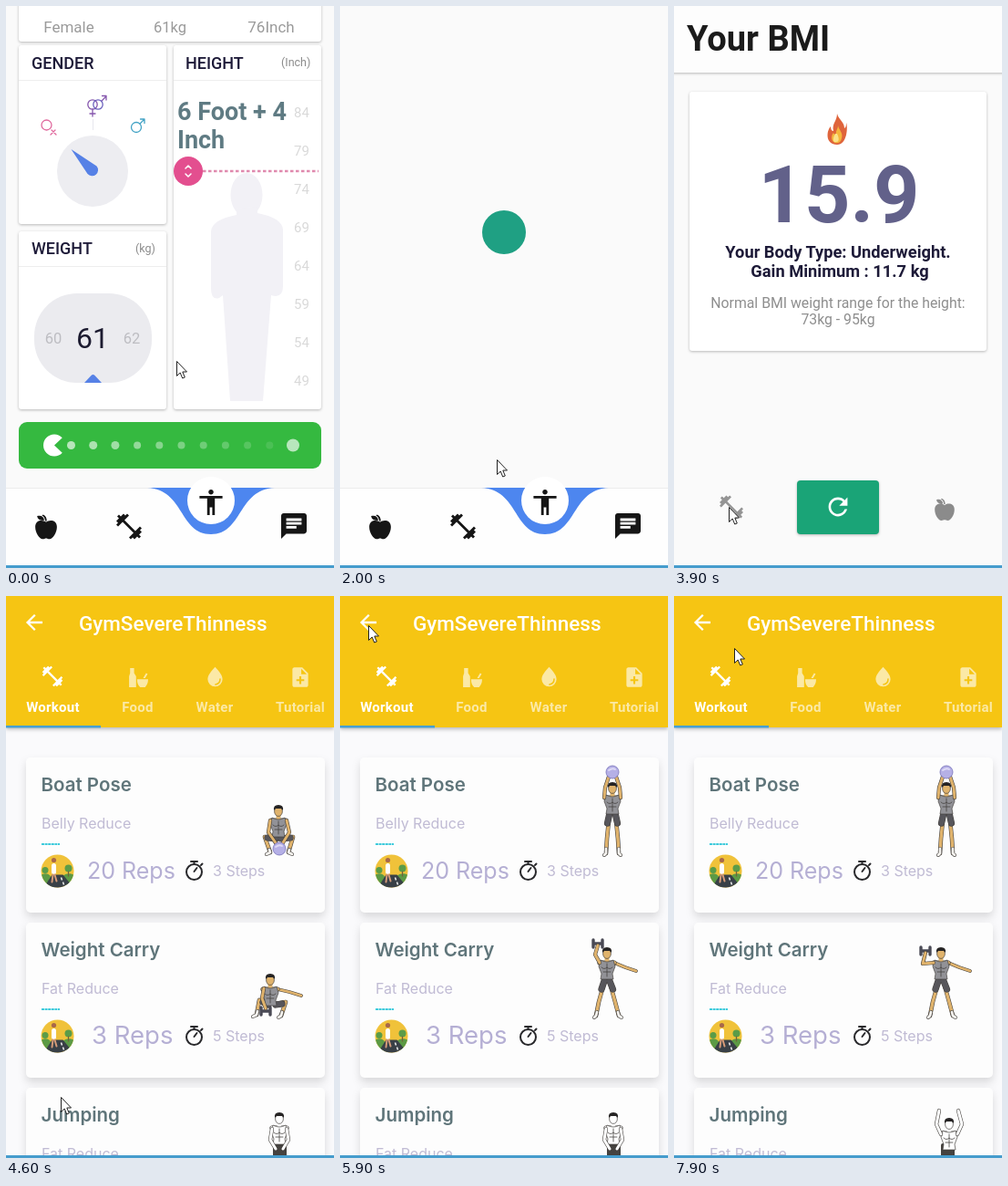
Write an HTML page that moves like this. It is 360 px wide and 616 px high and loops after 8 s.

```html
<!DOCTYPE html>
<html lang="en">
<head>
<meta charset="utf-8">
<title>BMI calculator</title>
<style>
html, body { margin: 0; width: 100%; height: 100%; overflow: hidden; background: #fafafa; }
#stage { display: block; width: 100vw; height: 100vh; font-family: Roboto, sans-serif; }
.card { fill: #fff; filter: drop-shadow(0 1px 1.5px #0004); }
.tall { fill: #fdfdfd; filter: drop-shadow(0 5px 5px #0002); }
.b { font-weight: 700; }
.m { font-weight: 500; }
.s { font-weight: 600; }
.geo { font-family: Inter, sans-serif; }
.mid { text-anchor: middle; }
.line { fill: none; stroke-linecap: round; stroke-linejoin: round; }
</style>
</head>
<body>
<svg id="stage" viewBox="0 0 360 616" preserveAspectRatio="none"></svg>
<script>
const LOOP = 8000;
let css = '';

// Frames are [ms, declarations]; the last one holds until the loop restarts.
const anim = (name, ...frames) => {
  const last = frames[frames.length - 1][1];
  const body = [...frames, [LOOP, last]].map(([ms, d]) => `${ms / LOOP * 100}%{${d}}`).join('');
  css += `@keyframes ${name}{${body}}.${name}{animation:${name} ${LOOP}ms linear infinite}`;
};
const move = (x, y, extra = '') => `transform:translate(${x}px,${y}px)${extra}`;
const shape = d => `d:path("${d}")`;
const swing = (name, times, poses) => anim(name, ...times.map(([ms, p]) => [ms, poses[p]]));
const ease = ';animation-timing-function:ease-in-out';

const text = (x, y, size, fill, str, cls = '') =>
  `<text x="${x}" y="${y}" font-size="${size}" fill="${fill}" class="${cls}">${str}</text>`;
const icon = (x, y, scale, fill, d) =>
  `<path transform="translate(${x} ${y}) scale(${scale}) translate(-12 -12)" fill="${fill}" d="${d}"/>`;
const rect = (x, y, w, h, r, attrs) =>
  `<rect x="${x}" y="${y}" width="${w}" height="${h}" rx="${r}" ${attrs}/>`;
const circle = (x, y, r, attrs) => `<circle cx="${x}" cy="${y}" r="${r}" ${attrs}/>`;

const ICONS = {
  person: 'M12 2c1.1 0 2 .9 2 2s-.9 2-2 2-2-.9-2-2 .9-2 2-2zm9 7h-6v13h-2v-6h-2v6H9V9H3V7h18v2z',
  chat: 'M20 2H4c-1.1 0-2 .9-2 2v18l4-4h14c1.1 0 2-.9 2-2V4c0-1.1-.9-2-2-2zM6 9h12v2H6V9zm8 5H6v-2h8v2zm4-6H6V6h12v2z',
  refresh: 'M17.65 6.35C16.2 4.9 14.21 4 12 4c-4.42 0-8 3.58-8 8s3.58 8 8 8c3.73 0 6.84-2.55 7.73-6h-2.08c-.82 2.33-3.04 4-5.65 4-3.31 0-6-2.69-6-6s2.69-6 6-6c1.66 0 3.14.69 4.22 1.78L13 11h7V4z',
  back: 'M20 11H7.83l5.59-5.59L12 4l-8 8 8 8 1.41-1.41L7.83 13H20z',
  note: 'M14 2H6c-1.1 0-2 .9-2 2v16c0 1.1.9 2 2 2h12c1.1 0 2-.9 2-2V8zm2 14h-3v3h-2v-3H8v-2h3v-3h2v3h3zm-3-7V3.5L18.5 9z',
  weights: 'M20.57 14.86L22 13.43 20.57 12 17 15.57 8.43 7 12 3.43 10.57 2 9.14 3.43 7.71 2 5.57 4.14 4.14 2.71 2.71 4.14l1.43 1.43L2 7.71l1.43 1.43L2 10.57 3.43 12 7 8.43 15.57 17 12 20.57 13.43 22l1.43-1.43L16.29 22l2.14-2.14 1.43 1.43 1.43-1.43-1.43-1.43L22 16.29z',
  apple: 'M12 8c2-2 9-2.500 9 4 0 5-3.500 10-6 10-1.500 0-2-.6-3-.6s-1.500.6-3 .6c-2.500 0-6-5-6-10 0-6.500 7-6 9-4zM11.300 7C11 4.500 10 3 8.500 2.500l1-.8C11.500 2.500 12.500 4 12.600 7zM4.500 3c3-1 5.500 0 6 3.500C7.500 7 5 6 4.500 3z',
  drop: 'M12 2c4.500 5 7.500 8.500 7.500 12.500a7.500 7.500 0 0 1-15 0C4.500 10.500 7.500 7 12 2z',
  food: 'M4 3h4v5l2 3v11H3V11l1-3zM11 14h11c0 4-1.500 6-3 8h-5c-2-2-3-4-3-8zm6-1 3-5 1.500.8L19 13z'
};

// ---- Input page ----
anim('home', [0, 'opacity:1'], [1400, 'opacity:1'], [1700, 'opacity:0']);
anim('nav', [0, 'opacity:1'], [2200, 'opacity:1'], [2500, 'opacity:0']);
anim('marker', [0, move(0, 0)], [100, move(0, 0, ease)], [300, move(0, -8)]);
anim('body', [0, 'transform:scaleY(1)'], [100, 'transform:scaleY(1)' + ease], [300, 'transform:scaleY(1.032)']);
css += '.body{transform-origin:264px 433px}';
anim('before', [0, 'opacity:1'], [200, 'opacity:1'], [200.1, 'opacity:0']);
anim('after', [0, 'opacity:0'], [200, 'opacity:0'], [200.1, 'opacity:1']);
anim('dot', [0, 'opacity:var(--from)'], [100, 'opacity:var(--from)'], [500, 'opacity:var(--to)']);
anim('pac', [0, move(0, 0)], [900, move(0, 0, ease)], [1450, move(262, 0)]);
const wide = 'stroke-dasharray:76 24;stroke-dashoffset:-12';
const shut = 'stroke-dasharray:98 2;stroke-dashoffset:-1';
anim('chomp', ...[0, 900, 1000, 1100, 1200, 1300, 1400, 1500].map((ms, i) => [ms, i > 1 && i % 2 === 0 ? shut : wide]));

const scale = [84, 79, 74, 69, 64, 59, 54, 49]
  .map((n, i) => text(316, 121.500 + 42 * i, 15, '#d9d9d9', n)).join('');
const dots = Array.from({ length: 10 }, (_, i) =>
  circle(71.500 + 24.200 * i, 481.500, i < 3 ? 4.500 : 4,
    `class="dot" fill="#fff" style="--from:${(0.650 - 0.060 * i).toFixed(2)};--to:${i ? 0.180 : 0.450}"`)).join('');
const swap = (a, b) => `<g class="before">${a}</g><g class="after">${b}</g>`;
const foot = n => text(188, 125, 27, '#5f7b83', `6 Foot + ${n}`, 'b');

const home = `<g class="home">
  ${rect(14, -10, 332, 49, 3, 'class="card"')}
  ${rect(14, 43, 162, 196, 3, 'class="card"')}
  ${rect(14, 247, 162, 195, 3, 'class="card"')}
  ${rect(184, 43, 162, 399, 3, 'class="card"')}
  <path stroke="#eee" d="M14 81.500H176M184 81.500H346M14 285.500H176"/>
  ${text(69, 29, 17, '#9a9a9a', 'Female', 'mid')}
  ${text(180, 29, 16.500, '#9a9a9a', '61kg', 'mid')}
  ${swap(text(291, 29, 17, '#9a9a9a', '76Inch', 'mid'), text(291, 29, 17, '#9a9a9a', '77Inch', 'mid'))}
  ${text(28, 69, 18, '#1d1a38', 'GENDER', 'm')}
  ${text(197, 69, 18, '#1d1a38', 'HEIGHT', 'm')}
  ${text(28, 272, 18, '#1d1a38', 'WEIGHT', 'm')}
  ${text(302, 66, 12.500, '#8c8c8c', '(Inch)')}
  ${text(142, 270, 12.500, '#8c8c8c', '(kg)')}
  ${circle(95, 181, 39, 'fill="#ededf1"')}
  <path fill="#5681e6" d="M71.500 157 99.500 175.500A6.500 6.500 0 1 1 89.500 184Z"/>
  <path stroke="#e6e6ee" d="M95.500 124v12"/>
  <g class="line" stroke-width="1.300">
    <path stroke="#e0699d" d="M50 136l5 5M54 136l-5 5"/>${circle(44.500, 130.500, 5.500, 'stroke="#e0699d"')}
    <path stroke="#8657ad" d="M95 113v8M92 118h6M105 104l5-5M105.500 98.500h4.500v4.500"/>
    ${circle(95, 108, 5.200, 'stroke="#8657ad"')}${circle(101, 108, 5.200, 'stroke="#6a60bd"')}
    <path stroke="#43a3c5" d="M147 129l5-5M147.500 124h4.500v4.500"/>${circle(143, 133, 5.500, 'stroke="#43a3c5"')}
  </g>
  ${rect(31, 315, 129, 98, 47, 'fill="#ebebef"')}
  ${text(52, 370, 16.500, '#bdbdc2', '60', 'mid')}
  ${text(95, 375, 32, '#1c1b30', '61', 'mid')}
  ${text(138, 370, 16.500, '#bdbdc2', '62', 'mid')}
  <path fill="#5681e6" d="M86 413 93.500 405Q95.500 403 97.500 405L105 413Z"/>
  <g class="body" fill="#f2f1f6">
    <ellipse cx="264" cy="207" rx="17.500" ry="24"/>
    <path d="M253 222v7q-27 5-28 18v62q0 14 9 11l4-3 8 116h36l9-116q13 4 13-10v-62q-1-13-28-18v-7z"/>
  </g>
  ${scale}
  <g class="marker">
    ${swap(foot(4), foot(5))}
    ${text(188, 156, 27, '#5f7b83', 'Inch', 'b')}
    <path stroke="#e08aae" stroke-width="2.400" stroke-dasharray="3.500 2.500" d="M216 181H343"/>
    ${circle(200, 181, 16, 'fill="#e34f8f"')}
    <path class="line" stroke="#fff" stroke-width="1.500" d="M197 178l3-3 3 3M197 184l3 3 3-3"/>
  </g>
  <svg x="14" y="456" width="332" height="51" viewBox="14 456 332 51">
    ${rect(14, 456, 332, 51, 9, 'fill="#35b940"')}
    ${dots}${circle(315, 481.500, 7, 'fill="#fff" opacity=".65"')}
    <g class="pac">
      ${rect(-262, 470, 315, 24, 0, 'fill="#35b940"')}
      ${circle(53, 481.500, 6, 'class="chomp" fill="none" stroke="#fff" stroke-width="12" pathLength="100"')}
    </g>
  </svg>
</g>`;

const nav = `<g class="nav">
  ${rect(0, 528, 360, 88, 0, 'fill="#fefefe"')}
  <path stroke="#ececec" d="M0 528.500H360"/>
  <path fill="#4d86ef" d="M155 528C196 530 190 579 225 579S254 530 295 528Z"/>
  ${circle(225, 542, 26, 'fill="#fff"')}
  ${icon(225, 544, 1.400, '#161616', ICONS.person)}
  ${icon(44, 571, 1.320, '#161616', ICONS.apple)}
  ${icon(135, 570.500, 1.400, '#161616', ICONS.weights)}
  ${icon(316, 570, 1.400, '#161616', ICONS.chat)}
</g>`;

// ---- Travelling ball ----
anim('ball', [0, move(180, 481, ' scale(0)')], [1400, move(180, 481, ' scale(0)' + ease)],
  [1600, move(180, 528, ' scale(1)' + ease)], [2000, move(180, 248, ' scale(1);opacity:1')],
  [2200, move(180, 248, ' scale(1);opacity:1')], [2450, move(180, 248, ' scale(1);opacity:0')]);

// ---- Result page ----
anim('result', [0, 'opacity:0'], [2250, 'opacity:0'], [2600, 'opacity:1']);
anim('detail', [0, 'opacity:.4'], [2500, 'opacity:.4'], [3100, 'opacity:1']);
const result = `<g class="result">
  ${rect(0, 0, 360, 613, 0, 'fill="#fafafa"')}
  ${rect(-5, -5, 370, 78, 0, 'class="card" style="fill:#fdfdfd"')}
  ${rect(17, 94, 326, 284, 3, 'class="card"')}
  ${rect(135, 520, 90, 59, 4, 'class="card" style="fill:#1aa477"')}
  <g class="detail">
    ${text(14, 49, 38, '#1b1b1b', 'Your BMI', 'b')}
    <path fill="#df643b" d="M179 118c2 7 8 9 8 16 2-1 2-4 2-6 2 5 1 24-10 24-13 0-12-15-7-20 0 3 1 5 3 5-2-8 4-11 4-19z"/>
    <path fill="#f5b63c" d="M180 131c1 5 6 8 4 14-1 7-10 7-11 0 0-3 1-5 2-6 1 2 2 2 3 2-1-4 2-6 2-10z"/>
    <path fill="#fbe28a" d="M179 140c2 4 3 9-1 9-4 1-4-4-1-9z"/>
    ${text(181, 237, 88, '#62618a', '15.9', 'b mid')}
    ${text(180, 276, 18.300, '#1d1a38', 'Your Body Type: Underweight.', 'b mid')}
    ${text(182, 297, 18.300, '#1d1a38', 'Gain Minimum : 11.7 kg', 'b mid')}
    ${text(180, 331, 15.800, '#8e8e8e', 'Normal BMI weight range for the height:', 'mid')}
    ${text(180, 349, 15.800, '#8e8e8e', '73kg - 95kg', 'mid')}
    ${icon(180, 549, 1.300, '#fff', ICONS.refresh)}
    ${icon(63, 549.500, 1.300, '#949494', ICONS.weights)}
    ${icon(297, 552, 1.200, '#8b8b8b', ICONS.apple)}
  </g>
</g>`;

// ---- Workout page ----
anim('gym', [0, move(0, 60, ';opacity:0')], [4100, move(0, 60, ';opacity:0;animation-timing-function:ease-out')],
  [4400, move(0, 0, ';opacity:1')]);

const SKIN = '#e0b36c', INK = '#45423f', SHIRT = '#929297', SHORTS = '#57565b';
const limb = (cls, color, width) => [[INK, width + 1.200], [color, width]]
  .map(([c, w]) => `<path class="line ${cls}" stroke="${c}" stroke-width="${w}"/>`).join('');
const bust = (x, skin, shirt) => `
  <path class="line" stroke="${INK}" stroke-width="5.200" d="M${x - 8} 221h16"/>
  <path class="line" stroke="${skin}" stroke-width="4" d="M${x - 8} 221h16"/>
  <path fill="${shirt}" stroke="${INK}" stroke-width=".7" d="M${x - 7} 218q7 4 14 0l2 7-3 8 1 6h-14l1-6-3-8z"/>
  <path class="line" stroke="${INK}" stroke-width=".8" d="M${x} 222v14M${x - 6} 226q3 3 6 0 3 3 6 0M${x - 4} 231h8"/>
  ${rect(x - 2.500, 213, 5, 6, 1, `fill="${skin}"`)}
  <ellipse cx="${x}" cy="211" rx="4.400" ry="5.400" fill="${skin}" stroke="${INK}" stroke-width=".7"/>
  <path fill="#262424" d="M${x - 5} 210q-1-6 5-6t5 6l-2-2h-6z"/>`;

const lift = [[0, 'low'], [4700, 'low'], [5400, 'top'], [6000, 'top'], [6400, 'low'], [6700, 'low'], [7400, 'top']];
swing('bust1', lift, { low: move(0, 25), top: move(0, 0) });
swing('ball1', lift, { low: move(300, 277), top: move(299, 193) });
swing('arms1', lift, {
  low: shape('M290 246L288 259L297 272M308 246L311 259L303 272'),
  top: shape('M290 221L291 210L295 198M308 221L307 210L303 198') });
swing('legs1', lift, {
  low: shape('M296 266L284 264L290 281M302 266L315 264L310 281'),
  top: shape('M295 246L293 266L292 282M303 246L305 266L306 282') });
swing('feet1', lift, {
  low: shape('M289 278L290 281L286 283M311 278L310 281L314 283'),
  top: shape('M292 277L292 282L290 284M306 277L306 282L308 284') });
swing('shorts1', lift, {
  low: shape('M296 266L287 265M302 266L312 265'),
  top: shape('M295.500 240L293.500 249M302.500 240L304.500 249') });

const carry = [[0, 'low'], [5000, 'low'], [5800, 'top'], [6000, 'top'], [6400, 'low'], [6800, 'low'], [7500, 'bent']];
const carryPoses = (low, top, bent = top) => ({ low, top, bent });
swing('bust2', carry, carryPoses(move(-3, 29), move(0, 0)));
swing('bell2', carry, carryPoses(move(285, 274), move(283, 200), move(276, 208)));
swing('hold2', carry, carryPoses(shape('M283 249L281 260L285 271'),
  shape('M285 221L280 212L283 202'), shape('M285 221L273 222L276 210')));
swing('reach2', carry, carryPoses(shape('M298 250L311 253L324 257'), shape('M301 221L313 226L325 230')));
swing('legs2', carry, carryPoses(shape('M288 266L278 262L275 278M296 266L307 264L302 279'),
  shape('M289 246L284 264L281 279M297 246L302 264L306 279')));
swing('feet2', carry, carryPoses(shape('M276 274L275 278L271 280M303 275L302 279L299 281'),
  shape('M282 275L281 279L279 281M305 275L306 279L309 281')));
swing('shorts2', carry, carryPoses(shape('M288 267L282 264M296 267L303 266'),
  shape('M290 241L287 250M296 241L299.500 250')));

const jump = [[0, 'low'], [6000, 'low'], [6400, 'top'], [6800, 'low'], [7100, 'low'], [7500, 'top']];
swing('bust3', jump, { low: move(0, 0), top: move(2, 6) });
swing('arms3', jump, {
  low: shape('M292 222L290 234L296 244M308 222L310 234L304 244'),
  top: shape('M293 228L288 217L291 202M311 228L316 217L312 202') });

const figures = [
  `${limb('legs1', SKIN, 3.400)}${limb('feet1', '#f4f2ee', 2.800)}${limb('shorts1', SHORTS, 6)}
   <g class="bust1">${bust(299, SKIN, SHIRT)}</g>${limb('arms1', SKIN, 3)}
   <g class="ball1">${circle(0, 0, 7, 'fill="#b5b0e6" stroke="#7771b8" stroke-width=".8"')}
     <path class="line" stroke="#dedaf6" stroke-width="2" d="M-4-2Q0-5 3-3"/></g>`,
  `${limb('legs2', SKIN, 3.400)}${limb('feet2', '#f4f2ee', 2.800)}${limb('shorts2', SHORTS, 6)}
   ${limb('reach2', SKIN, 2.600)}
   <g class="bust2">${bust(293, SKIN, SHIRT)}</g>
   <g class="bell2"><path class="line" stroke="#4a4a55" stroke-width="3.400" d="M-5-4V4M5-4V4M-5 0H5"/></g>
   ${limb('hold2', SKIN, 3)}`,
  `${rect(293, 238, 15, 20, 2, `fill="${INK}"`)}
   <g class="bust3">${bust(300, '#fff', '#fff')}</g>${limb('arms3', '#fff', 3)}`
];

const thumb = `<g transform="translate(56.500 301.500)">
  ${circle(0, 0, 18, 'fill="#f0c23a"')}
  <path fill="#5c9a45" d="M-17.500 4Q-12 1-8 5L-4 17.500A18 18 0 0 1-17.500 4ZM17.500 4Q12 1 6 5L10 15A18 18 0 0 0 17.500 4Z"/>
  <path fill="#394047" d="M-6 4H6L13 12.500A18 18 0 0 1-12 13.500Z"/>
  <path stroke="#eee" stroke-width="1.500" d="M4 7l1 3M6 12l1 3"/>
  ${circle(-13.500, -1, 3.500, 'fill="#5b9c48"')}${circle(12, -3, 4, 'fill="#5b9c48"')}
  <path stroke="#75603a" stroke-width="1.200" d="M12 0v6"/>
  <path class="line" stroke="#fff" stroke-width="5" d="M-4-6v7"/>
  <path class="line" stroke="#d59a78" stroke-width="2" d="M-5 4l-1 8M-3 4l2 7"/>
  ${circle(-4, -12, 2.600, 'fill="#a8684a"')}
</g>`;
const watch = `<path class="line" stroke="#29292c" stroke-width="2" d="M203 291h7M206.500 291v3M214 295l1.500-1.500M206.500 302l3-4"/>
  ${circle(206.500, 302.500, 8.500, 'fill="none" stroke="#29292c" stroke-width="2"')}`;

const card = ([title, goal, reps, steps, repX, repSize], i) => `<g transform="translate(0 ${181 * i})">
  ${rect(22, 177, 328, 170, 5, 'class="tall"')}
  ${text(38.500, 214, 20.500, '#5f757a', title, 'geo s')}
  ${text(39, 255, 16, '#c0bbd4', goal, 'geo')}
  <path stroke="#3fcbdc" stroke-width="2" stroke-dasharray="3 .6" d="M39 272H59"/>
  ${thumb}${watch}
  ${text(repX, 310, repSize, '#b5afd4', reps, 'geo')}
  ${text(227, 307, 16, '#c0bbd4', steps, 'geo')}
  ${figures[i]}
</g>`;

const PALE = '#fbe9a6';
const gym = `<g class="gym">
  ${rect(0, 0, 360, 680, 0, 'fill="#fafafc"')}
  ${[['Boat Pose', 'Belly Reduce', '20 Reps', '3 Steps', 89, 25],
     ['Weight Carry', 'Fat Reduce', '3 Reps', '5 Steps', 94, 27.500],
     ['Jumping', 'Fat Reduce', '5 Reps', '4 Steps', 94, 27.500]].map(card).join('')}
  ${rect(0, 0, 360, 144, 0, 'fill="#f6c513" style="filter:drop-shadow(0 2px 2px #0004)"')}
  ${rect(0, 142, 104, 2.500, 0, 'fill="#469fd0"')}
  ${icon(31, 29, 1.130, '#fff', ICONS.back)}
  ${text(80, 38, 22.500, '#fff', 'GymSevereThinness', 'm')}
  ${icon(51, 88, 1.130, '#fff', ICONS.weights)}
  ${icon(145, 89, 1.100, PALE, ICONS.food)}
  ${icon(229.500, 88.500, 1.080, PALE, ICONS.drop)}
  <path class="line" stroke="#f6c513" stroke-width="1.600" d="M230 97q5-1 5-6"/>
  ${icon(323, 89, 1.080, PALE, ICONS.note)}
  <g letter-spacing=".25">
    ${[['Workout', 51.500], ['Food', 144.500], ['Water', 229], ['Tutorial', 323]]
      .map(([s, x], i) => text(x, 126.500, 15, i ? PALE : '#fff', s, 'b mid')).join('')}
  </g>
</g>`;

// ---- Pointer ----
anim('cursor', ...[[0, 187, 389], [100, 187, 389], [500, 176, 478], [1300, 176, 478], [1700, 172, 497],
  [2700, 172, 497], [3100, 60, 549], [5000, 60, 549], [5700, 31, 32], [7000, 31, 32],
  [7400, 12, 22], [7700, 12, 22], [7900, 66, 57]].map(([ms, x, y]) => [ms, move(x, y, ease)]));
const cursor = `<path class="cursor" fill="#fff" stroke="#222" d="M.5.500V16.500L4.200 13 6.700 19 9.300 18 6.800 12H11.500Z"/>`;

const stage = document.getElementById('stage');
stage.innerHTML = home + nav + circle(0, 0, 24, 'class="ball" fill="#1fa083"') + result + gym +
  rect(0, 613, 360, 3, 0, 'fill="#459ccd"') + cursor;
document.head.appendChild(document.createElement('style')).textContent = css;
</script>
</body>
</html>
```
